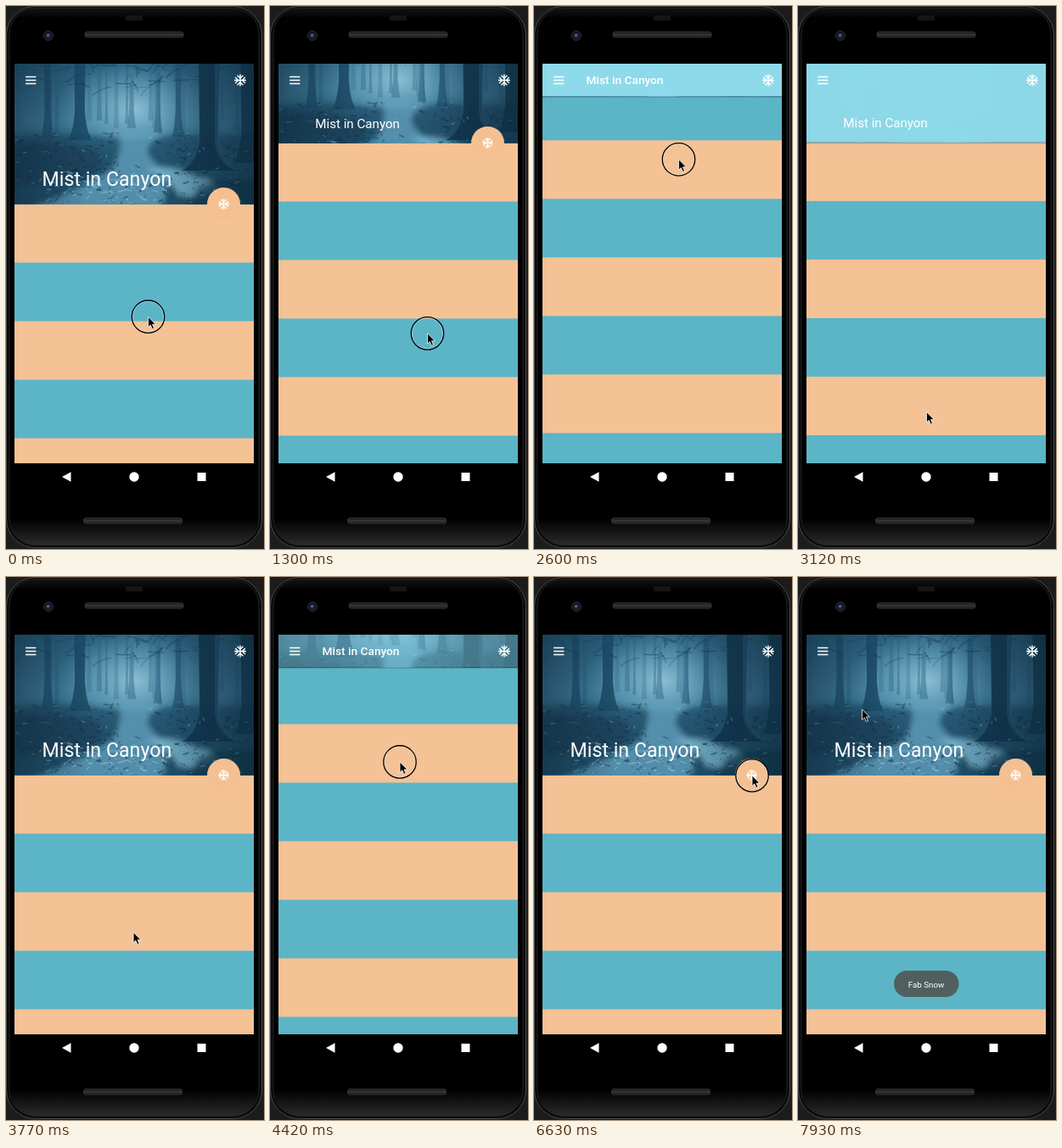
Write an HTML page that moves like this. It is 304 px wide and 640 px high and loops after 8 s.

```html
<!DOCTYPE html>
<html lang="en">
<head>
<meta charset="utf-8">
<title>Collapsing header</title>
<style>
html, body { margin: 0; width: 100%; height: 100%; overflow: hidden; background: #000; }
svg { display: block; width: 304px; height: 640px; }
text { font-family: Roboto, "Open Sans", sans-serif; fill: #fff; }
</style>
</head>
<body>
<svg viewBox="0 0 304 640" xmlns="http://www.w3.org/2000/svg">
  <defs>
    <clipPath id="screenClip"><rect x="10" y="68" width="282" height="471"/></clipPath>
    <clipPath id="headClip"><rect id="headBox" x="10" y="68" width="282" height="166"/></clipPath>
    <filter id="soft"><feGaussianBlur stdDeviation="3"/></filter>
    <filter id="hazy"><feGaussianBlur stdDeviation=".7"/></filter>
    <linearGradient id="air" x2="0" y2="1">
      <stop offset="0" stop-color="#285a77"/><stop offset=".4" stop-color="#437f9d"/>
      <stop offset=".6" stop-color="#346b88"/><stop offset="1" stop-color="#224d68"/>
    </linearGradient>
    <radialGradient id="mist">
      <stop offset="0" stop-color="#9bccdd" stop-opacity=".85"/>
      <stop offset=".5" stop-color="#74afc7" stop-opacity=".55"/>
      <stop offset="1" stop-color="#5f9db8" stop-opacity="0"/>
    </radialGradient>
    <linearGradient id="dusk">
      <stop offset="0" stop-color="#0c2739" stop-opacity=".5"/><stop offset=".3" stop-color="#0c2739" stop-opacity="0"/>
      <stop offset=".62" stop-color="#0c2739" stop-opacity="0"/><stop offset="1" stop-color="#0c2739" stop-opacity=".6"/>
    </linearGradient>
    <linearGradient id="metal" x2="0" y2="1">
      <stop offset="0" stop-color="#111"/><stop offset=".5" stop-color="#393838"/><stop offset="1" stop-color="#151515"/>
    </linearGradient>
    <linearGradient id="body" x2="0" y2="1">
      <stop offset="0" stop-color="#141414"/><stop offset=".02" stop-color="#000"/>
      <stop offset=".95" stop-color="#000"/><stop offset="1" stop-color="#2b2b2b"/>
    </linearGradient>
    <path id="flake" d="M22 11h-4.17l3.24-3.24-1.41-1.42L15 11h-2V9l4.66-4.66-1.42-1.41L13 6.17V2h-2v4.17L7.76 2.93 6.34 4.34 11 9v2H9L4.34 6.34 2.93 7.76 6.17 11H2v2h4.17l-3.24 3.24 1.41 1.42L9 13h2v2l-4.66 4.66 1.42 1.41L11 17.83V22h2v-4.17l3.24 3.24 1.42-1.41L13 15v-2h2l4.66 4.66 1.41-1.42L17.83 13H22z" fill="#fff"/>
  </defs>

  <!-- phone -->
  <rect width="304" height="640" fill="#1c1c1c"/>
  <rect x=".5" y=".5" width="301" height="638" rx="34" fill="#0a0a0a" stroke="#4a4a4a"/>
  <rect x="4" y="2.500" width="294" height="633" rx="31" fill="url(#body)" stroke="#222"/>
  <rect x="141" y="11" width="20" height="6" rx="1" fill="#151515"/>
  <rect x="93" y="30.500" width="116" height="6.500" rx="2.500" fill="url(#metal)" stroke="#333"/>
  <rect x="91.500" y="603.500" width="116" height="6.500" rx="2.500" fill="url(#metal)" stroke="#333"/>
  <circle cx="50" cy="35" r="5.500" fill="#14161b" stroke="#2b2d33"/>
  <circle cx="50" cy="35" r="3" fill="#1c2848"/>
  <circle cx="49.500" cy="34.500" r="1.200" fill="#6d83b4"/>

  <g clip-path="url(#screenClip)">
    <rect x="10" y="68" width="282" height="471" fill="#5bb5c6"/>
    <g id="stripes" fill="#f4c295"></g>
    <rect id="shade" x="10" width="282" height="1.500" fill="#24505c" opacity=".3"/>
    <g clip-path="url(#headClip)">
      <g id="forest"></g>
      <rect id="scrim" x="10" y="68" width="282" height="167" fill="#8edaea"/>
    </g>
    <g id="fab">
      <circle r="19.500" fill="#f4c092"/>
      <use href="#flake" transform="scale(.65) translate(-12 -12)"/>
    </g>
    <text id="title">Mist in Canyon</text>
    <path d="M23 83.500h12.400M23 87.500h12.400M23 91.500h12.400" stroke="#fff" stroke-width="1.300"/>
    <use href="#flake" transform="translate(276 87.500) scale(.7) translate(-12 -12)"/>
    <g id="toast">
      <rect x="113" y="464" width="76.500" height="31" rx="15.500" fill="#50605f"/>
      <text x="151" y="483.500" font-size="9.800" text-anchor="middle">Fab Snow</text>
    </g>
  </g>

  <g fill="#fff">
    <path d="M66 555l10.500-5.800v11.600z"/><circle cx="151" cy="555" r="5.700"/><rect x="225.500" y="550" width="10" height="10"/>
  </g>
  <g id="pointer">
    <g id="touch" fill="none">
      <circle r="18.200" stroke="#fff" opacity=".45"/>
      <circle r="19.200" stroke="#000" stroke-width="1.300"/>
    </g>
    <path d="M0 0V12.400l2.800-2.600 2 4.700 2.200-.9-2-4.600h3.900z" stroke="#fff" stroke-width=".8"/>
  </g>
</svg>

<script>
const LOOP = 8000, OPEN = 234, SHUT = 107, BAND = 69;
const $ = id => document.getElementById(id);

function add(parent, tag, attrs) {
  const el = document.createElementNS("http://www.w3.org/2000/svg", tag);
  set(el, attrs);
  return parent.appendChild(el);
}
function set(el, attrs) {
  for (const key in attrs) el.setAttribute(key, attrs[key]);
}

let seed = 11;
function rand(lo, hi) {
  seed = (seed * 16807) % 2147483647;
  return lo + (hi - lo) * seed / 2147483647;
}

function paintForest(g) {
  const cover = fill => add(g, "rect", { x: 10, y: 68, width: 282, height: 167, fill });
  const layer = filter => add(g, "g", { filter: `url(#${filter})` });
  const shape = (to, d, fill, opacity) => add(to, "path", { d, fill, opacity });
  const trunk = (to, x, w, base, flare, fill, opacity) => shape(to,
    `M${x - w / 2} 60L${x - w * .45} ${base - 35}Q${x - w * .6} ${base - 8} ${x - w / 2 - flare} ${base}` +
    `H${x + w / 2 + flare}Q${x + w * .6} ${base - 8} ${x + w * .45} ${base - 35}L${x + w / 2} 60z`, fill, opacity);
  const twigs = (count, box, reach, stroke, width, opacity) => {
    for (let i = 0; i < count; i++) {
      const dx = rand(-reach, reach), dy = rand(-reach, reach) * .5;
      add(g, "path", {
        d: `M${rand(box[0], box[1])} ${rand(box[2], box[3])}q${dx * .5} ${dy * .1} ${dx} ${dy}`,
        stroke, "stroke-width": rand(.5, width), fill: "none", opacity });
    }
  };

  cover("url(#air)");
  add(g, "ellipse", { cx: 150, cy: 122, rx: 90, ry: 62, fill: "url(#mist)" });
  const far = layer("hazy");
  for (let i = 0; i < 18; i++)
    trunk(far, rand(15, 285), rand(2, 5), rand(135, 152), 1, "#28607e", rand(.2, .45));
  trunk(far, 49, 8, 157, 4, "#1d4a65", .7);
  trunk(far, 148, 5, 144, 3, "#3b7794", .6);
  trunk(far, 179, 5, 149, 3, "#2d6581", .65);
  trunk(far, 203, 7, 154, 4, "#235570", .75);

  const ground = layer("soft");
  shape(ground, "M0 154Q60 147 108 154T205 151Q250 155 303 150V245H0z", "#23506a", .8);
  shape(ground, "M0 163Q60 157 105 170Q128 182 95 202L0 215z", "#193f57", .7);
  shape(ground, "M132 148Q165 145 181 154Q156 166 174 183Q200 210 180 240H25Q95 213 126 192Q140 165 132 148z", "#62a2bf", .75);
  shape(ground, "M165 192Q199 186 224 202Q247 204 250 216Q225 229 202 222Q195 202 165 192z", "#7cb8d0", .85);
  shape(ground, "M226 214Q260 199 303 204V245H210z", "#153a51", .7);

  const near = layer("hazy");
  trunk(near, 87, 13, 158, 8, "#1d4b66", .9);
  trunk(near, 285, 17, 185, 8, "#12364d", .75);
  trunk(near, 239, 24, 194, 20, "#143850", .92);
  shape(near, "M246 60h4q1 70 2 102q3 20 18 31q-23-8-24-36z", "#3a6d89", .45);

  twigs(55, [10, 292, 64, 98], 24, "#173f58", 2, .5);
  twigs(110, [10, 135, 148, 206], 7, "#113044", 2.4, .5);
  twigs(110, [180, 292, 150, 234], 7, "#113044", 2.4, .5);
  twigs(60, [10, 292, 145, 232], 6, "#8cc3d9", 1.5, .5);
  twigs(65, [40, 190, 195, 234], 8, "#8fc7dd", 2.2, .5);
  twigs(65, [40, 190, 190, 234], 8, "#17415a", 2.2, .55);
  cover("url(#dusk)");
}

// [time, top of the list]
const scroll = [[0, 234], [520, 234], [1300, 162], [1900, 98], [2600, 21], [2730, 0], [3120, 161],
  [3320, 234], [3800, 234], [4420, 36], [4500, 32], [4900, 234], [8000, 234]];
// [time, x, y]
const path = [[0, 167.5, 366], [520, 176, 458], [1300, 185.5, 386], [2600, 170.5, 181], [2730, 168, 160],
  [3120, 151.5, 478.5], [3800, 150, 416], [4420, 153, 218], [4500, 153, 214], [4900, 160, 416],
  [5330, 228, 406], [6200, 257, 234], [7280, 257, 234], [7930, 75.5, 156], [8000, 72, 150]];
const presses = [[0, 3000], [3800, 4950], [6500, 6650]];
// Header passes its trigger height: [time, collapsed]
const triggers = [[-1000, 0], [1480, 1], [3120, 0], [4076, 1], [4700, 0]];

const clamp = (v, lo = 0, hi = 1) => Math.min(hi, Math.max(lo, v));
const mix = (a, b, k) => a + (b - a) * k;

function sample(keys, t, col = 1) {
  const i = Math.max(1, keys.findIndex(k => k[0] >= t));
  const a = keys[i - 1], b = keys[i];
  return mix(a[col], b[col], (t - a[0]) / (b[0] - a[0]));
}

function bezier(x1, y1, x2, y2) {
  const at = (a, b, s) => 3 * (1 - s) * (1 - s) * s * a + 3 * (1 - s) * s * s * b + s * s * s;
  return x => {
    let lo = 0, hi = 1;
    for (let i = 0; i < 20; i++) {
      const mid = (lo + hi) / 2;
      if (at(x1, x2, mid) < x) lo = mid; else hi = mid;
    }
    return x <= 0 ? 0 : x >= 1 ? 1 : at(y1, y2, lo);
  };
}
const inOut = bezier(.4, 0, .2, 1), easeIn = bezier(.4, 0, 1, 1), easeOut = bezier(0, 0, .2, 1);

function collapseFade(t, duration) {
  const [start, collapsed] = triggers.filter(k => k[0] <= t).pop();
  const k = clamp((t - start) / duration);
  return collapsed ? easeIn(k) : 1 - easeOut(k);
}

paintForest($("forest"));
for (let i = 0; i < 6; i++)
  add($("stripes"), "rect", { x: 10, y: i * 2 * BAND, width: 282, height: BAND });

function draw(t) {
  const top = sample(scroll, t), head = Math.max(SHUT, top);
  const fold = (OPEN - head) / (OPEN - SHUT);
  const scrim = collapseFade(t, 600), fab = 1 - collapseFade(t, 200);

  set($("stripes"), { transform: `translate(0 ${top - .5})` });
  set($("headBox"), { height: head - 68.5 });
  set($("shade"), { y: head - .5, visibility: scrim > 0 ? "visible" : "hidden" });
  set($("forest"), { transform: `translate(0 ${(head - OPEN) / 2})` });
  set($("scrim"), { opacity: scrim });
  set($("fab"), { transform: `translate(256.5 ${head - .5}) scale(${fab})`, opacity: fab });
  set($("title"), {
    x: mix(42.5, 61.5, fold), y: mix(211.5, 92.3, fold),
    "font-size": mix(23.2, 13.7, inOut(fold)), "font-weight": fold >= 1 ? 500 : 400
  });
  set($("toast"), { opacity: clamp((t - 6650) / 200) });
  set($("pointer"), { transform: `translate(${sample(path, t)} ${sample(path, t, 2)})` });
  const down = presses.some(([from, to]) => t >= from && t < to);
  set($("touch"), { visibility: down ? "visible" : "hidden" });
}

function tick() {
  draw(performance.now() % LOOP);
  requestAnimationFrame(tick);
}
tick();
</script>
</body>
</html>
```
